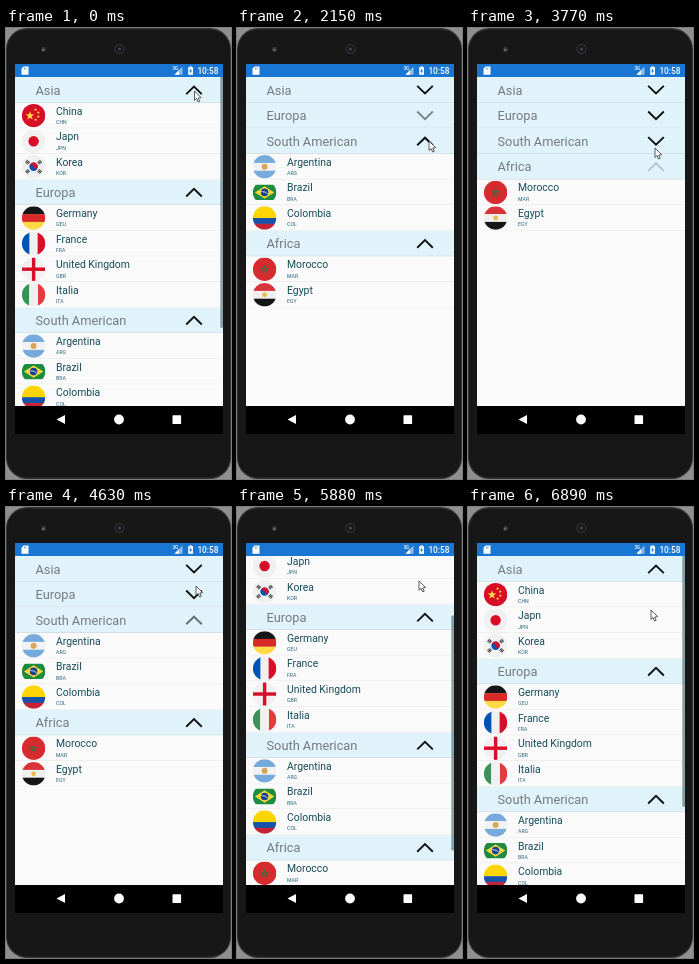
An HTML page with a canvas for the animation above (6.98 s loop, 225 px wide and 451 px high).

```html
<!DOCTYPE html>
<html lang="en">
<head>
<meta charset="utf-8">
<title>Expandable country list</title>
<style>
html, body { margin: 0; width: 100%; height: 100%; overflow: hidden; background: #8f8f8f; }
canvas { display: block; width: 225px; height: 451px; }
</style>
</head>
<body>
<canvas id="stage"></canvas>
<script>
const W = 225, H = 451, LOOP = 6980;
const ROW = 25.6, TOP = 49.2, VIEW = 328.8, LEFT = 9, WIDTH = 208;
const canvas = document.getElementById('stage');
const ctx = canvas.getContext('2d');
const dpr = window.devicePixelRatio || 1;
canvas.width = W * dpr;
canvas.height = H * dpr;

const clamp = v => Math.max(0, Math.min(1, v));
const ease = v => v * v * (3 - 2 * v);

// Interpolates keys of the form [time, value, ...].
function track(keys, t, i = 1) {
  if (t <= keys[0][0]) return keys[0][i];
  for (let k = 1; k < keys.length; k++) {
    const a = keys[k - 1], b = keys[k];
    if (t < b[0]) return a[i] + (b[i] - a[i]) * (t - a[0]) / (b[0] - a[0]);
  }
  return keys[keys.length - 1][i];
}

// toggles: [start, end, open, arrow fade start, arrow fade end]
const groups = [
  { name: 'Asia', items: [['China', 'CHN'], ['Japn', 'JPN'], ['Korea', 'KOR']],
    toggles: [[950, 1300, 0, 950, 1520], [5130, 5450, 1, 5130, 5700]] },
  { name: 'Europa', items: [['Germany', 'GEU'], ['France', 'FRA'], ['United Kingdom', 'GBR'], ['Italia', 'ITA']],
    toggles: [[1640, 1980, 0, 1700, 2620], [4650, 4950, 1, 4650, 5400]] },
  { name: 'South American', items: [['Argentina', 'ARG'], ['Brazil', 'BRA'], ['Colombia', 'COL']],
    toggles: [[2330, 2680, 0, 2400, 3240], [3830, 4150, 1, 4050, 5050]] },
  { name: 'Africa', items: [['Morocco', 'MAR'], ['Egypt', 'EGY']],
    toggles: [], arrow: [[2800, 1], [3400, .2], [3800, .2], [4450, 1]] }
];

const pointer = [
  [0, 188.5, 63], [1150, 188.5, 63], [1430, 189, 88], [1800, 189, 88], [2140, 192, 113],
  [2400, 192, 113], [2650, 187, 120], [3900, 187, 120], [4230, 189, 91], [4390, 190, 87],
  [4530, 190, 87], [4620, 190, 79], [4960, 190, 79], [5130, 188, 62], [5450, 188, 62],
  [5600, 184, 120], [5880, 182, 74], [6040, 182, 54], [6120, 182, 80], [6190, 182, 84],
  [6420, 183, 128], [6670, 183, 144], [6770, 183, 144], [6890, 183, 103]
];
const scrollKeys = [[5600, 0], [5880, 54], [6040, 80], [6120, 80], [6190, 74], [6420, 31], [6670, 0]];

function box(color, x, y, w, h) {
  ctx.fillStyle = color;
  ctx.fillRect(x, y, w, h);
}
function dot(color, x, y, r) {
  ctx.fillStyle = color;
  ctx.beginPath();
  ctx.arc(x, y, r, 0, Math.PI * 2);
  ctx.fill();
}
function poly(color, pts) {
  ctx.fillStyle = color;
  ctx.beginPath();
  pts.forEach(p => ctx.lineTo(p[0], p[1]));
  ctx.closePath();
  ctx.fill();
}
function round(color, x, y, w, h, r) {
  ctx.fillStyle = color;
  ctx.beginPath();
  ctx.roundRect(x, y, w, h, r);
  ctx.fill();
}
function text(s, x, y, size, color, weight = 400) {
  ctx.font = `${weight} ${size}px Roboto, sans-serif`;
  ctx.fillStyle = color;
  ctx.fillText(s, x, y);
}
function star(color, x, y, r) {
  poly(color, Array.from({ length: 10 }, (_, i) => {
    const a = i * Math.PI / 5 - Math.PI / 2, q = i % 2 ? r * .4 : r;
    return [x + q * Math.cos(a), y + q * Math.sin(a)];
  }));
}

const R = 11.7;
// Stripes take parts of the flag height or width.
function stripes(colors, parts = [1, 1, 1], upright = false) {
  const sum = parts.reduce((a, b) => a + b);
  let at = -R;
  colors.forEach((c, i) => {
    const size = parts[i] / sum * 2 * R;
    if (upright) box(c, at, -R, size + .1, 2 * R);
    else box(c, -R, at, 2 * R, size + .1);
    at += size;
  });
}
const fill = c => box(c, -R, -R, 2 * R, 2 * R);

const flags = {
  CHN() {
    fill('#d80d27');
    star('#ffda44', -3.6, .2, 4.6);
    [[2, -6], [4.7, -3], [4.7, 1], [2, 4]].forEach(p => star('#ffda44', p[0], p[1], 1.7));
  },
  JPN() { fill('#f0f0f0'); dot('#d80d27', 0, 0, 5.2); },
  KOR() {
    fill('#f0f0f0');
    dot('#0052b4', 0, 0, 4.2);
    ctx.fillStyle = '#d80d27';
    ctx.beginPath();
    ctx.arc(0, 0, 4.2, Math.PI, 0);
    ctx.arc(2.1, 0, 2.1, 0, Math.PI);
    ctx.arc(-2.1, 0, 2.1, 0, Math.PI, true);
    ctx.fill();
    for (const sx of [-1, 1]) for (const sy of [-1, 1]) {
      ctx.save();
      ctx.translate(sx * 6, sy * 4.6);
      ctx.rotate(-sx * sy * .85);
      for (let i = -1; i < 2; i++) box('#222', -1.7, i * 1.3 - .4, 3.4, .8);
      ctx.restore();
    }
  },
  GEU() { stripes(['#151515', '#d82b27', '#ffda44']); },
  FRA() { stripes(['#0052b4', '#f0f0f0', '#d80d27'], [1, 1.05, 1], true); },
  GBR() { fill('#f0f0f0'); box('#d80d27', -1.7, -R, 3.4, 2 * R); box('#d80d27', -R, -1.7, 2 * R, 3.4); },
  ITA() { stripes(['#3a9159', '#f0f0f0', '#e33a3a'], [1, 1.2, 1], true); },
  ARG() { stripes(['#75aadb', '#f2f2f2', '#75aadb']); dot('#d9a55b', 0, 0, 3); },
  BRA() {
    round('#1d8b40', -R, -7.7, 2 * R, 15.4, 4);
    poly('#ffd93b', [[-9.6, 0], [0, -6.2], [9.6, 0], [0, 6.2]]);
    dot('#16438f', 0, 0, 3.8);
    ctx.strokeStyle = '#eee';
    ctx.lineWidth = .8;
    ctx.beginPath();
    ctx.moveTo(-3.5, -.8);
    ctx.quadraticCurveTo(1, -1.2, 3.2, 1.6);
    ctx.stroke();
  },
  COL() { stripes(['#ffd500', '#1653a8', '#c52236'], [2, 1, 1]); },
  MAR() { fill('#d62b2f'); star('#32713b', 0, .3, 5); star('#d62b2f', 0, .3, 2); },
  EGY() { stripes(['#d83338', '#f0f0f0', '#151515']); dot('#e6bd4b', 0, 0, 2.4); }
};

function drawItem([name, code], y, alpha) {
  ctx.save();
  ctx.globalAlpha = alpha;
  box('#fafafa', LEFT, y, WIDTH, ROW);
  box('#ececec', LEFT, y + ROW - .8, WIDTH, .8);
  const mid = y + ROW / 2;
  ctx.save();
  ctx.translate(27.6, mid);
  ctx.beginPath();
  ctx.arc(0, 0, R, 0, Math.PI * 2);
  ctx.clip();
  flags[code]();
  ctx.restore();
  text(name, 50, mid - 1, 10.4, '#164b5b');
  text(code, 50, mid + 8.3, 5.2, '#28657a');
  ctx.restore();
}

function drawHeader(name, y, open, alpha) {
  box('#e1f3fa', LEFT, y, WIDTH, ROW);
  box('#d0dce1', LEFT, y + ROW - .8, WIDTH, .8);
  const mid = y + ROW / 2, d = open ? 1 : -1;
  text(name, 29.5, mid + 4.6, 12.8, '#757b7e');
  ctx.save();
  ctx.globalAlpha = alpha;
  ctx.strokeStyle = '#111';
  ctx.lineWidth = 1.9;
  ctx.beginPath();
  ctx.moveTo(180.2, mid + d * 4.1);
  ctx.lineTo(188, mid - d * 3.5);
  ctx.lineTo(195.8, mid + d * 4.1);
  ctx.stroke();
  ctx.restore();
}

function groupState(g, t) {
  const s = { size: 1, alpha: 1, open: true, arrow: g.arrow ? track(g.arrow, t) : 1 };
  for (const [from, to, open, fadeFrom, fadeTo] of g.toggles) {
    if (t < from) break;
    const p = (t - from) / (to - from);
    // Closing fades, then slides; opening slides, then fades.
    const first = ease(clamp(p / .5)), second = ease(clamp((p - .4) / .6));
    s.size = open ? first : 1 - second;
    s.alpha = open ? second : 1 - first;
    s.open = !!open;
    s.arrow = clamp((t - fadeFrom) / (fadeTo - fadeFrom));
  }
  return s;
}

function drawList(t) {
  const scroll = track(scrollKeys, t);
  ctx.save();
  ctx.beginPath();
  ctx.rect(LEFT, 49, WIDTH, 329);
  ctx.clip();
  box('#fafafa', LEFT, 49, WIDTH, 329);
  let y = TOP - scroll;
  for (const g of groups) {
    const s = groupState(g, t), end = y + ROW * (1 + g.items.length * s.size);
    drawHeader(g.name, y, s.open, s.arrow);
    if (s.alpha > 0) {
      ctx.save();
      ctx.beginPath();
      ctx.rect(LEFT, y + ROW, WIDTH, Math.max(0, end - y - ROW));
      ctx.clip();
      g.items.forEach((item, i) => drawItem(item, y + ROW * (i + 1), s.alpha));
      ctx.restore();
    }
    y = end;
  }
  const total = y - TOP + scroll;
  const shown = t < 760 || (t >= 910 && t < 1760) || t > 4700;
  if (shown && total > VIEW) {
    const length = VIEW * VIEW / total * .95 - Math.min(16, scroll * .6);
    box('rgba(70,100,110,.6)', 214.3, 49 + scroll * 1.1, 2.7, length);
  }
  ctx.restore();
}

function drawPhone() {
  box('#8f8f8f', 0, 0, W, H);
  round('#333', 0, 0, W, H, 21);
  round('#171717', 1, 1.5, W - 2, H - 3, 20);
  dot('#3d3d3d', 37.5, 21.5, 2.4);
  dot('#777', 37.2, 22, 1);
  dot('#303033', 113.5, 21, 5.2);
  dot('#17171d', 113.5, 21, 3.8);
  dot('#45455a', 113.5, 21, 1.6);

  box('#1976d2', LEFT, 36, WIDTH, 13);
  poly('#fff', [[17.5, 38.5], [22.5, 38.5], [22.5, 46.7], [15.5, 46.7], [15.5, 40.7]]);
  box('#1976d2', 18, 39.7, .7, 1.7);
  box('#1976d2', 19.6, 39.7, .7, 1.7);
  poly('#8fbce8', [[176.5, 38.5], [176.5, 46.7], [168.5, 46.7]]);
  poly('#fff', [[173, 42], [173, 46.7], [168.5, 46.7]]);
  text('3G', 166.5, 42.3, 4.6, '#fff', 500);
  box('#fff', 183.6, 38.3, 2, 1.2);
  box('#fff', 182.2, 39.2, 4.8, 7.6);
  poly('#1976d2', [[185, 40.3], [183.1, 43.5], [184.4, 43.5], [184.2, 45.8], [186.1, 42.6], [184.9, 42.6]]);
  text('10:58', 191.4, 45.7, 8.3, '#fff', 500);

  box('#000', LEFT, 378, WIDTH, 28);
  poly('#fff', [[50.5, 391.5], [59, 387], [59, 396]]);
  dot('#fff', 113, 391.5, 4.9);
  round('#fff', 166.5, 387.3, 8.6, 8.6, .6);
}

function drawPointer(x, y) {
  const shape = [[0, 0], [0, 9.4], [2.1, 7.5], [3.6, 11], [5.2, 10.3], [3.7, 7], [6.6, 6.7]];
  poly('#fff', shape.map(p => [x + p[0], y + p[1]]));
  ctx.strokeStyle = '#333';
  ctx.lineWidth = .8;
  ctx.stroke();
}

function draw(now) {
  const t = now % LOOP;
  ctx.setTransform(dpr, 0, 0, dpr, 0, 0);
  drawPhone();
  drawList(t);
  drawPointer(track(pointer, t, 1), track(pointer, t, 2));
}

const start = performance.now();
function tick() {
  draw(performance.now() - start);
  requestAnimationFrame(tick);
}
tick();
</script>
</body>
</html>
```
